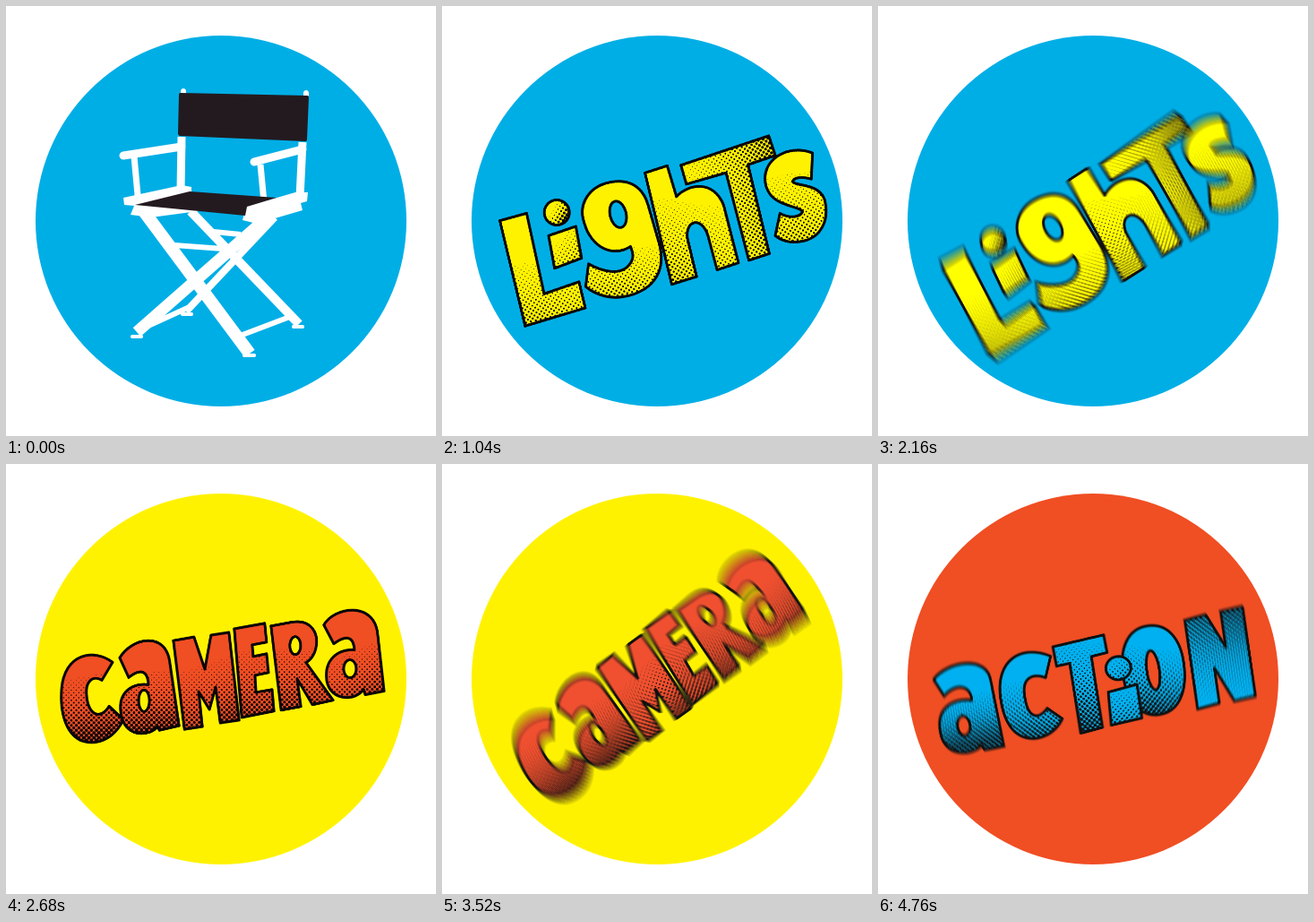
Write an HTML page with a canvas that moves like this. It is 480 by 480 pixels and loops after 4800 ms.

```html
<!DOCTYPE html>
<html lang="en">
<head>
<meta charset="utf-8">
<title>Lights, camera, action</title>
<style>
html, body { margin: 0; height: 100%; overflow: hidden; background: #fff; }
canvas { display: block; width: 100vmin; height: 100vmin; }
</style>
</head>
<body>
<canvas id="stage" width="480" height="480"></canvas>
<script>
const SIZE = 480, LOOP = 4800, STEP = 40, SHUTTER = 13, SAMPLES = 16;
const BLUE = '#00aee6', YELLOW = '#fff200', ORANGE = '#f04e23', INK = '#0a0508';

// Letters: outline, ellipse (counter or dot), halftone from light point to dark point.
const LIGHTS = [
  ['M71 196L102 195L100 287L141 283L141 313L71 317Z', null, [110, 230, 75, 385]],
  ['M120 225L152 222L150 258L118 262Z', null, [126, 222, 170, 285]],
  ['', [135, 202, 14, 14], [128, 196, 145, 213]],
  ['M162 220C160 198 177 183 198 183C222 183 235 196 236 218L238 262C239 293 221 311 190 311C171 311 156 302 147 290L156 266C170 279 187 286 198 279C206 274 208 268 206 258C184 266 163 249 162 220Z',
    [201, 220, 9, 15], [205, 240, 188, 365]],
  ['M241 182L267 180L269 216C285 205 314 207 318 238L319 304L294 306L293 266C291 243 272 244 270 264L270 308L241 310Z', null, [310, 205, 235, 390]],
  ['M282 183L385 174L387 197L355 200L355 302L331 304L329 203L283 205Z', null, [255, 200, 430, 215]],
  ['M428 204L420 232C409 226 401 226 399 230C401 236 427 238 429 258C429 284 413 299 392 297C380 296 371 291 366 284L377 261C385 269 398 271 402 265C399 257 370 252 369 228C368 198 404 187 428 204Z',
    null, [405, 195, 395, 370]]
];
const CAMERA = [
  ['M119 221L107 241C97 235 88 242 90 259C92 281 106 285 115 270L131 285C119 309 99 314 83 308C67 300 60 278 62 251C65 211 98 205 119 221Z', null, [88, 222, 103, 318]],
  ['M127 216C141 193 179 186 183 222L193 292L171 297L169 293C159 305 131 305 128 277C125 254 141 244 159 246C158 228 148 229 137 238Z', [154, 264, 6, 12], [150, 220, 162, 310]],
  ['M187 197L210 193L222 229L229 191L249 188L260 286L239 289L234 249L227 274L215 254L219 293L199 296Z', null, [205, 212, 240, 315]],
  ['M255 184L289 178L291 199L275 202L276 215L291 212L293 233L278 236L279 255L297 252L299 276L263 283Z', null, [280, 190, 282, 310]],
  ['M296 181L318 177C339 173 350 187 346 206C344 214 340 219 335 222L365 264L342 269L325 240L329 271L307 275Z', [323, 203, 6, 10], [335, 190, 328, 300]],
  ['M355 180C366 160 411 153 415 190L422 254L401 258L399 252C391 265 362 266 358 242C355 219 370 207 389 208C388 190 377 193 366 201Z', [384, 229, 7, 10], [375, 200, 412, 285]]
];
const ACTION = [
  ['M64 215C82 197 126 196 127 225L131 300L109 301L107 295C95 306 62 304 63 272C63 247 82 239 103 244C104 227 88 222 73 235Z', [90, 271, 7, 11], [95, 226, 98, 302]],
  ['M197 208L188 231C176 224 161 226 162 249C162 273 173 277 185 265L200 279C191 293 176 298 163 296C143 292 135 273 135 247C135 203 167 190 197 208Z', null, [165, 215, 163, 315]],
  ['M201 198L259 193L260 213L242 215L243 295L218 298L217 219L202 220Z', null, [250, 180, 215, 310]],
  ['M309 190C333 190 344 212 343 240C342 272 328 290 308 290C286 290 274 269 274 241C274 211 286 190 309 190Z', [308, 240, 7, 22], [325, 205, 298, 300]],
  ['M255 257L288 253L288 291L253 294Z', null, [270, 245, 272, 320]],
  ['', [270, 232, 14, 13], [260, 215, 285, 265]],
  ['M351 190L375 187L392 226L392 186L417 184L417 285L393 287L376 247L376 287L351 290Z', null, [365, 310, 385, 150]]
];

// Degrees at each step of the turn.
const TURN = [-3, 2, 13, 38, 90, 146, 200, 246, 282, 309, 329, 342, 349, 353];

function sprite(draw) {
  const c = document.createElement('canvas');
  c.width = c.height = SIZE * 2;
  const g = c.getContext('2d');
  g.scale(2, 2);
  g.lineJoin = 'round';
  draw(g);
  return c;
}

function halftone(g, [x0, y0, x1, y1]) {
  const dx = x1 - x0, dy = y1 - y0, len2 = dx * dx + dy * dy, gap = 2.8;
  g.fillStyle = INK;
  g.beginPath();
  for (let row = 0; row * gap < SIZE; row++) {
    for (let col = row % 2; col * gap < SIZE; col += 2) {
      const x = col * gap, y = row * gap;
      const f = Math.min(((x - x0) * dx + (y - y0) * dy) / len2, 0.85);
      if (f < 0.15) continue;
      const r = 2.2 * f;
      g.moveTo(x + r, y);
      g.arc(x, y, r, 0, 7);
    }
  }
  g.fill();
}

function drawWord(g, letters, color) {
  for (const [d, oval, shade] of letters) {
    const p = new Path2D(d);
    if (oval) {
      const [x, y, rx, ry] = oval;
      p.moveTo(x + rx, y);
      p.ellipse(x, y, rx, ry, 0, 0, Math.PI * 2);
    }
    g.fillStyle = color;
    g.fill(p, 'evenodd');
    g.save();
    g.clip(p, 'evenodd');
    halftone(g, shade);
    g.restore();
    g.strokeStyle = INK;
    g.lineWidth = 3;
    g.stroke(p);
  }
}

function drawChair(g) {
  const line = (w, d, cap = 'butt') => {
    g.lineWidth = w;
    g.lineCap = cap;
    g.stroke(new Path2D(d));
  };
  const shape = (color, d) => {
    g.fillStyle = color;
    g.fill(new Path2D(d));
  };
  g.strokeStyle = '#fff';
  // back legs and braces
  line(10, 'M206 229L327 355');
  line(8, 'M201 341L300 236');
  line(6, 'M188 267L242 271M232 252L262 255');
  line(6, 'M264 367L322 345M150 361L207 335');
  // front legs and feet
  line(14, 'M153 228L272 388');
  line(13, 'M146 364L294 234');
  line(4, 'M266 390L277 390M141 369L151 369M197 344L207 344M321 358L331 358', 'round');
  // posts and arms
  line(6, 'M198 95L198 98M335 97L335 100', 'round');
  line(9, 'M196 146L195 206M331 152L328 214');
  line(7, 'M143 168L147 211M284 177L288 219');
  line(9, 'M131 167L196 157M277 174L331 160', 'round');
  // seat
  shape('#fff', 'M131 214L196 200L207 202L207 209L222 228L162 236L139 233L143 223L132 222Z');
  shape('#fff', 'M268 224L323 208L337 208L336 218L329 220L331 228L280 243L264 239Z');
  shape('#231a1f', 'M144 222L205 207L302 214L269 224L267 234Z');
  shape('#231a1f', 'M195 97L336 100Q338 100 338 102L336 149Q336 151 334 151L194 145Q192 144 192 142L193 99Q193 97 195 97Z');
}

const word = (letters, color) => sprite(g => drawWord(g, letters, color));

// base: tilt at which the art is drawn; from, to: tilt over the slow drift.
const scenes = [
  { start: 0, spin: 520, from: 0, to: 0, base: 0, cx: 237, cy: 241, bg: BLUE, art: sprite(drawChair) },
  { start: 1040, spin: 1760, from: -16.5, to: -3, base: -3, cx: 252, cy: 245, bg: BLUE, art: word(LIGHTS, YELLOW) },
  { start: 2280, spin: 3133, from: -16.5, to: -3, base: -10, cx: 241, cy: 241.5, bg: YELLOW, art: word(CAMERA, ORANGE) },
  { start: 3560, spin: 4280, from: -16.5, to: -3, base: -3, cx: 240, cy: 241.5, bg: ORANGE, art: word(ACTION, BLUE) }
];

function angle(s, t) {
  if (t <= s.spin) {
    const k = Math.max(0, (t - s.start) / (s.spin - s.start));
    return s.from + (s.to - s.from) * k;
  }
  const p = (t - s.spin) / STEP, i = Math.min(Math.floor(p), TURN.length - 2);
  return TURN[i] + (TURN[i + 1] - TURN[i]) * (p - i);
}

const ctx = document.getElementById('stage').getContext('2d');
const layer = document.createElement('canvas');
layer.width = layer.height = SIZE;
const blur = layer.getContext('2d');

function drawTurned(g, s, deg) {
  g.save();
  g.translate(s.cx, s.cy);
  g.rotate((deg - s.base) * Math.PI / 180);
  g.drawImage(s.art, -s.cx, -s.cy, SIZE, SIZE);
  g.restore();
}

function render(t) {
  const s = scenes.filter(x => x.start <= t).pop();
  ctx.fillStyle = '#fff';
  ctx.fillRect(0, 0, SIZE, SIZE);
  ctx.fillStyle = s.bg;
  ctx.beginPath();
  ctx.arc(240, 240, 207, 0, 7);
  ctx.fill();

  if (t <= s.spin) {
    drawTurned(ctx, s, angle(s, t));
    return;
  }
  // motion blur: average of poses while the shutter is open
  const a = angle(s, t - SHUTTER / 2), b = angle(s, t + SHUTTER / 2);
  blur.clearRect(0, 0, SIZE, SIZE);
  blur.globalCompositeOperation = 'lighter';
  blur.globalAlpha = 1 / SAMPLES;
  for (let i = 0; i < SAMPLES; i++) drawTurned(blur, s, a + (b - a) * i / (SAMPLES - 1));
  ctx.drawImage(layer, 0, 0);
}

const begin = performance.now();
function tick() {
  const t = (performance.now() - begin) % LOOP;
  render(Math.floor(t / STEP) * STEP);
  requestAnimationFrame(tick);
}
tick();
</script>
</body>
</html>
```
